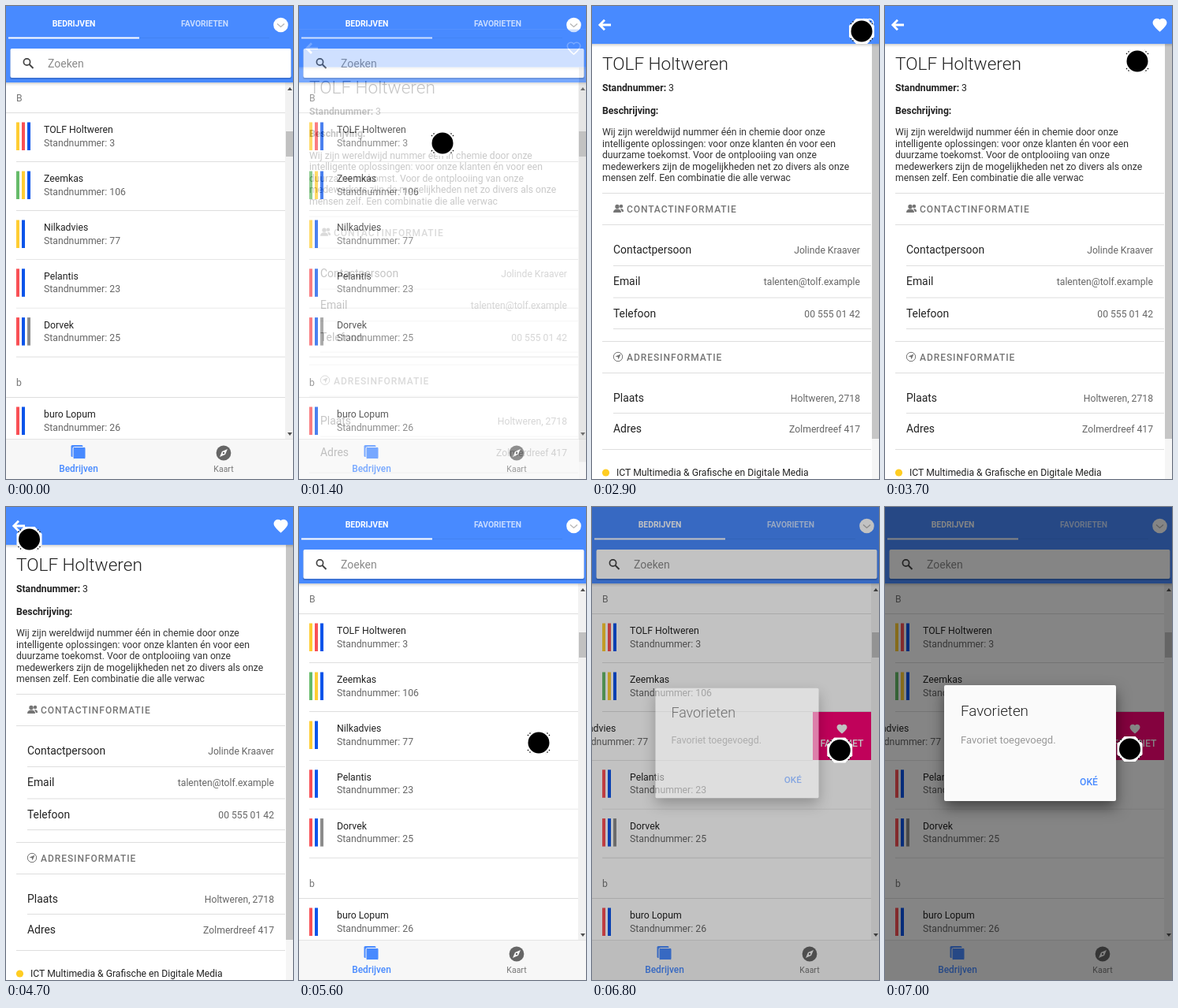
Write an HTML page that moves like this. It is 364x600 px and loops after 7100 ms.

```html
<!DOCTYPE html>
<html lang="nl">
<head>
<meta charset="utf-8">
<style>
html, body { margin: 0; width: 100%; height: 100%; overflow: hidden; background: #fff }
svg { display: block; width: 364px; height: 600px; overflow: hidden; font: 12.25px Roboto, Arial, sans-serif }
</style>
</head>
<body>
<svg id="stage" viewBox="0 0 364 600"></svg>
<script>
const BLUE = '#488aff', INK = '#222', GREY = '#666';
const COLORS = { y: '#ffcd33', r: '#f95055', b: '#0a54ea', g: '#66bb6a', k: '#8c8c8c' };
const HEART = 'M12 21.35l-1.45-1.32C5.4 15.36 2 12.28 2 8.5 2 5.42 4.42 3 7.5 3c1.74 0 3.41.81 4.5 2.09C13.09 3.81 14.76 3 16.5 3 19.58 3 22 5.42 22 8.5c0 3.78-3.4 6.86-8.55 11.54z';

const rect = (x, y, w, h, fill, extra = '') =>
  `<rect x="${x}" y="${y}" width="${w}" height="${h}" fill="${fill}" ${extra}/>`;
const text = (x, y, str, fill = INK, size = 12.2, extra = '') =>
  `<text x="${x}" y="${y}" fill="${fill}" font-size="${size}" ${extra}>${str}</text>`;
const line = (y, x = 13, end = 354) => rect(x, y, end - x, 1, '#dedede');
const stroke = (d, color, width, extra = '') =>
  `<path d="${d}" fill="none" stroke="${color}" stroke-width="${width}" ${extra}/>`;
const heart = (x, y, scale, extra = 'fill="#fff"') =>
  `<path d="${HEART}" transform="translate(${x - 12 * scale} ${y - 12 * scale}) scale(${scale})" ${extra}/>`;
const header = h => rect(0, h, 364, 2, '#000', 'opacity=".1"') +
  rect(0, h, 364, 4, '#000', 'opacity=".04"') + rect(0, 0, 364, h, BLUE);
const MID = 'text-anchor="middle"', END = 'text-anchor="end"';

function row(y, name, stand, stripes, id = '') {
  return `<g id="${id}">` + rect(0, y, 354, 61.5, '#fff') +
    [...stripes].map((c, i) => rect(13 + 7 * i, y + 11.5, 4, 35.5, COLORS[c])).join('') +
    text(48, y + 25, name, INK, 12.25) +
    text(48, y + 41.6, 'Standnummer: ' + stand, GREY, 12.25) + line(y + 61) + '</g>';
}

const listPage = rect(0, 0, 364, 600, '#fff') +
  text(13, 121, 'B', '#777') + line(135, 0) +
  row(136, 'TOLF Holtweren', 3, 'yrb') +
  row(198, 'Zeemkas', 106, 'gyb') +
  rect(280, 260, 74, 61, '#fc0376') + heart(317, 281.5, .65) +
  text(317, 304, 'FAVORIET', '#fff', 12.2, MID + ' font-weight="500"') +
  row(260, 'Nilkadvies', 77, 'yb', 'swipe') +
  row(321.8, 'Pelantis', 23, 'rb') +
  row(383.6, 'Dorvek', 25, 'rbk') +
  text(13, 482, 'b', '#777') + line(496, 0) +
  row(497, 'buro Lopum', 26, 'rb') +
  // scrollbar
  rect(354, 97, 10, 452, '#f1f1f1') + rect(355, 159, 9, 32, '#c1c1c1') +
  '<path d="M357 107h6l-3-4zM357 541h6l-3 4z" fill="#505050"/>' +
  header(97) +
  text(86, 26, 'BEDRIJVEN', '#fff', 10.4, MID + ' font-weight="700"') +
  text(252, 26, 'FAVORIETEN', '#fff', 10.3, MID + ' font-weight="700" opacity=".7"') +
  rect(3, 39.5, 166, 2, '#fff') + rect(169, 40, 165, 1, '#4283f3') +
  '<circle cx="348.5" cy="24" r="9.3" fill="#fff"/>' + stroke('M344 22.5l4.5 4 4.5-4', '#b5b5b5', 1.3) +
  rect(5, 55, 357, 38, '#000', 'rx="2" opacity=".16"') + rect(5.5, 54, 356, 37, '#fff', 'rx="2"') +
  '<circle cx="26.5" cy="71" r="4.1" fill="none" stroke="#444" stroke-width="1.7"/>' +
  stroke('M29.5 74l5 5', '#444', 2) + text(53, 78, 'Zoeken', '#8a8a8a', 14) +
  // tab bar
  rect(0, 549, 364, 51, '#f7f7f7') + rect(0, 549, 364, 1, '#e4e4e4') +
  rect(82.5, 557, 15, 15, BLUE, 'rx="1.5"') +
  rect(85, 559.5, 16, 15, BLUE, 'rx="1.5" stroke="#f7f7f7"') +
  text(92, 591, 'Bedrijven', BLUE, 11.9, MID + ' font-weight="500"') +
  '<circle cx="276" cy="567" r="9.4" fill="#666"/>' +
  '<path d="M281 562l-3 7-7 3 3-7z" fill="#f7f7f7"/><circle cx="276" cy="567" r="1.2" fill="#666"/>' +
  text(276, 591, 'Kaart', '#777', 10.5, MID);

const field = (y, label, value) =>
  text(27, y, label, INK, 13.9) + text(340, y, value, GREY, 12.2, END);
const heading = (y, str) => line(y - 25) + line(y + 15) +
  text(44, y, str, '#757575', 12, 'font-weight="500" letter-spacing=".95"');
const story = [
  'Wij zijn wereldwijd nummer één in chemie door onze',
  'intelligente oplossingen: voor onze klanten én voor een',
  'duurzame toekomst. Voor de ontplooiing van onze',
  'medewerkers zijn de mogelijkheden net zo divers als onze',
  'mensen zelf. Een combinatie die alle verwac'];

const detailPage = rect(0, 0, 364, 640, '#fff') +
  rect(355, 48, 9, 501, '#c6c6c6') + rect(355, 549, 9, 51, '#f5f5f5') +
  header(48) +
  stroke('M24 24H10M16 17.7L9.8 24l6.2 6.3', '#fff', 2.8) +
  heart(348.5, 24, .82, 'id="like" stroke="#fff" stroke-width="1.9"') +
  text(13, 81, 'TOLF Holtweren', INK, 22.6, 'font-weight="300"') +
  text(13, 108, '<tspan font-weight="700">Standnummer:</tspan> 3') +
  text(13, 136.5, 'Beschrijving:', INK, 12.2, 'font-weight="700"') +
  story.map((s, i) => text(13, 164 + 14.6 * i, s, '#333')).join('') +
  heading(262, 'CONTACTINFORMATIE') +
  '<g fill="#757575"><circle cx="32" cy="254.5" r="2.7"/><path d="M27 262q0-4.5 5-4.5t5 4.5z"/>' +
  '<circle cx="37" cy="254" r="2.2"/><path d="M40 261q.5-4-4-4l2 4z"/></g>' +
  field(314, 'Contactpersoon', 'Jolinde Kraaver') + line(329, 27) +
  field(354, 'Email', 'talenten@tolf.example') + line(369.5, 27) +
  field(395, 'Telefoon', '00 555 01 42') + line(409, 27) +
  heading(450, 'ADRESINFORMATIE') +
  '<circle cx="33" cy="445" r="5.7" fill="none" stroke="#757575"/>' +
  '<path d="M36.5 441.5l-3 7-.8-3.2-3.2-.8z" fill="#757575"/>' +
  field(501.5, 'Plaats', 'Holtweren, 2718') + line(516, 27) +
  field(541, 'Adres', 'Zolmerdreef 417') + line(562) +
  '<circle cx="17.5" cy="592" r="4.6" fill="#ffcd22"/>' +
  text(31, 596, 'ICT Multimedia &amp; Grafische en Digitale Media');

const alertBox =
  `<g style="filter:drop-shadow(0 8px 9px rgba(0,0,0,.5))">${rect(75, 226, 218, 147, '#fafafa', 'rx="2"')}</g>` +
  text(96, 265, 'Favorieten', INK, 18.8, 'font-weight="300"') +
  text(96, 300, 'Favoriet toegevoegd.', '#999', 13) +
  text(270, 353, 'OKÉ', BLUE, 12.2, END + ' font-weight="500"');

const pointer =
  '<path d="M-7-16H7L16-7V7L7 16H-7L-16 7V-7z" fill="#fff"/><circle r="13.5"/>' +
  stroke('M-14-9l5-5M14-9l-5-5M-14 9l5 5M14 9l-5 5', '#000', 1.2, 'stroke-dasharray="1.5 2"');

const $ = id => document.getElementById(id);
$('stage').innerHTML = listPage + `<g id="detail">${detailPage}</g>` +
  rect(0, 0, 364, 600, '#000', 'id="shade"') +
  `<g id="alert">${alertBox}</g><g id="pointer">${pointer}</g>`;

// time, x, y
const route = [
  [400, 350, 420], [800, 190, 190], [1000, 182, 174], [2200, 182, 174],
  [2900, 342, 32], [3500, 342, 32], [3700, 320, 70], [4700, 29.5, 41], [4900, 18, 27],
  [5000, 18, 27], [5600, 304, 299], [5800, 300, 292], [6200, 226, 290],
  [6600, 318, 310], [7000, 310.5, 307]];
const ramp = (t, from, to) => Math.min(1, Math.max(0, (t - from) / (to - from)));
const ease = p => p * p * (3 - 2 * p);

function place(t) {
  const i = Math.max(1, route.findIndex(k => k[0] >= t));
  const [a, b] = [route[i - 1], route[i]], p = ease(ramp(t, a[0], b[0]));
  return [1, 2].map(n => a[n] + (b[n] - a[n]) * p);
}

function draw(t) {
  const open = ease(ramp(t, 1300, 1600)) * (1 - ease(ramp(t, 4900, 5100)));
  $('detail').setAttribute('opacity', open);
  $('detail').setAttribute('transform', `translate(0 ${40 * (1 - open)})`);
  $('like').setAttribute('fill', t >= 3200 ? '#fff' : 'none');

  const slide = 74 * ease(ramp(t, 5800, 6200));
  $('swipe').setAttribute('transform', `translate(${-slide} 0)`);

  const pop = ramp(t, 6700, 6900), scale = .9 + .1 * pop;
  $('shade').setAttribute('opacity', .48 * pop);
  $('alert').setAttribute('opacity', pop);
  $('alert').setAttribute('transform', `translate(184 300) scale(${scale}) translate(-184 -300)`);

  $('pointer').setAttribute('opacity', t < 400 ? 0 : 1);
  $('pointer').setAttribute('transform', `translate(${place(t)})`);
}

const start = performance.now();
function tick() {
  const t = (performance.now() - start) % 7100;
  draw(Math.floor(t / 100) * 100);
  requestAnimationFrame(tick);
}
tick();
</script>
</body>
</html>
```
